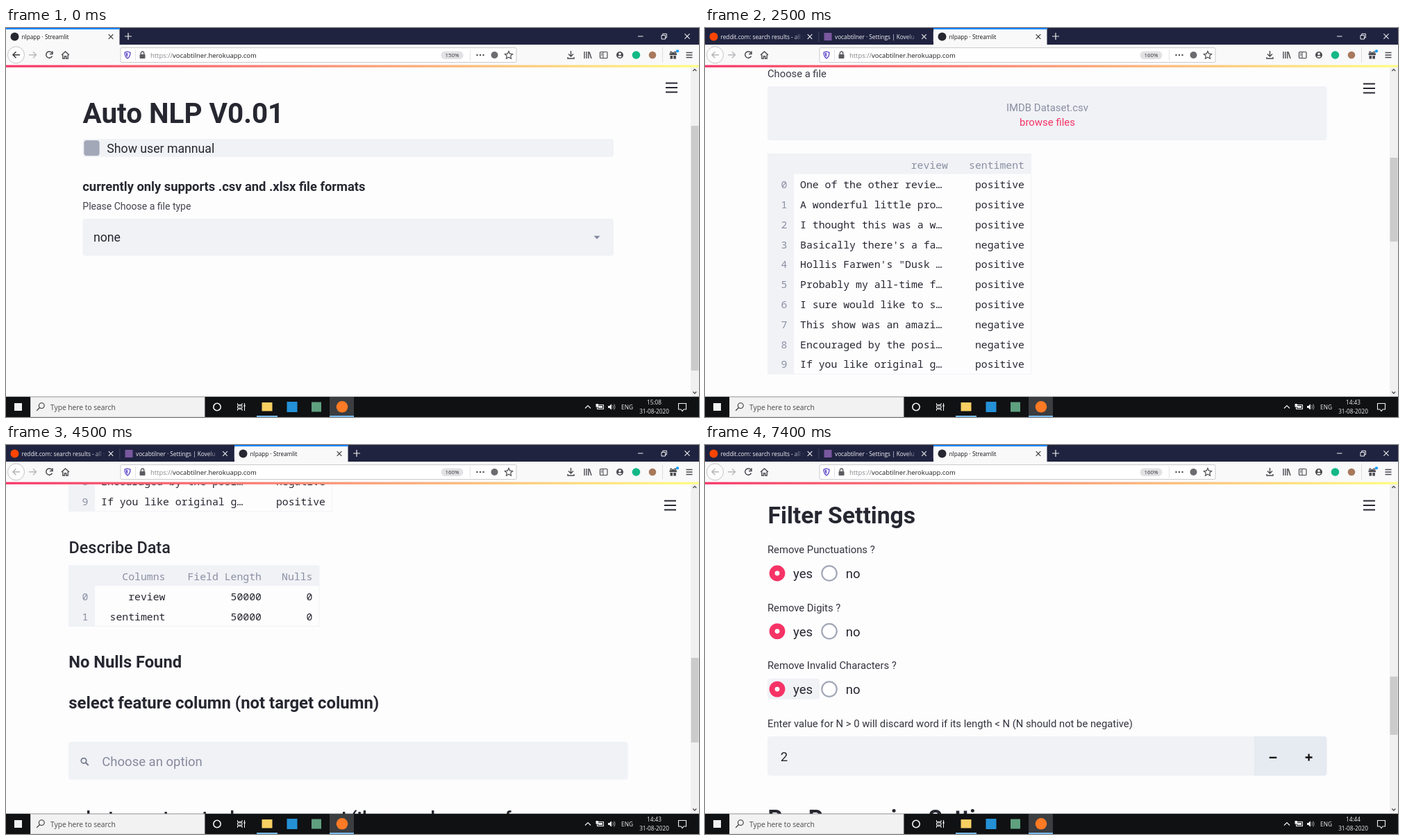
Write an HTML page that moves like this. It is 998 px wide and 561 px high and loops after 8 s.

```html
<!DOCTYPE html>
<html lang="en">
<head>
<meta charset="utf-8">
<title>Auto NLP</title>
<style>
html, body { margin: 0; width: 100%; height: 100%; overflow: hidden; background: #fdfdfe; }
svg { display: block; width: 100vw; height: 100vh; }
text { white-space: pre; }
.page { font-family: Roboto, sans-serif; }
.ui { font-family: "Open Sans", "Noto Sans", sans-serif; }
.mono { font-family: "Noto Sans Mono", "Liberation Mono", monospace; }
</style>
</head>
<body>
<svg id="stage" viewBox="0 0 998 561" xmlns="http://www.w3.org/2000/svg"></svg>
<script>
const INK = "#262730", MUTED = "#8a8fa2", GRAY = "#a3a8b8", PANEL = "#f0f2f6", PINK = "#f63366", NAVY = "#202340";
const APP = "vocabtilner";

const esc = s => s.replace(/&/g, "&amp;").replace(/</g, "&lt;").replace(/>/g, "&gt;");
const attrs = o => Object.entries(o).map(([k, v]) => ` ${k}="${v}"`).join("");
const rect = (x, y, w, h, fill, more = {}) => `<rect${attrs({ x, y, width: w, height: h, fill, ...more })}/>`;
const circle = (cx, cy, r, fill, more = {}) => `<circle${attrs({ cx, cy, r, fill, ...more })}/>`;
const line = (d, stroke, width = 1, more = {}) => `<path${attrs({ d, fill: "none", stroke, "stroke-width": width, ...more })}/>`;
const shape = (d, fill) => `<path d="${d}" fill="${fill}"/>`;
const label = (cls, x, y, size, s, fill = INK, more = {}) =>
  `<text${attrs({ class: cls, x, y, "font-size": size, fill, ...more })}>${esc(s)}</text>`;
const page = (...a) => label("page", ...a);
const bold = (x, y, size, s) => page(x, y, size, s, INK, { "font-weight": 700 });
const ui = (...a) => label("ui", ...a);
const mono = (x, y, s, fill = INK) => label("mono", x, y, 14.8, s, fill, { "text-anchor": "end" });
const centred = { "text-anchor": "middle" };
const panel = (y, h, more = {}) => rect(90, y, 805.5, h, PANEL, { rx: 4, ...more });
const cross = (x, y, r, color) => line(`M${x - r} ${y - r}l${2 * r} ${2 * r}m0 ${-2 * r}l${-2 * r} ${2 * r}`, color, 1.1);
const plus = (x, y, r, color, w) => line(`M${x - r} ${y}h${2 * r}M${x} ${y - r}v${2 * r}`, color, w);
const arrow = (x, y) => shape(`M${x - 4.5} ${y - 2.2}h9l-4.5 4.6z`, "#8388a0");
const menu = (x, y) => line(`M${x} ${y}h17m-17 6.5h17m-17 6.5h17`, INK, 2);

// Browser window
function tab(x, title, color, active, round = true) {
  const bg = active ? "#f9f9fa" : NAVY;
  return rect(x, 0, 163.5, 24, bg) +
    (active ? rect(x, 0, 163.5, 2, "#0a84ff") : line(`M${x + 164} 5v15`, "#4b4d66")) +
    (round ? circle(x + 12.5, 12.5, 6, color) : rect(x + 7, 7, 11, 11, color)) +
    `<svg x="${x}" y="0" width="142" height="24">${ui(22.5, 15.8, 8.25, title, active ? "#18181a" : "#f2f2f5")}</svg>` +
    rect(x + 126, 3, 17, 20, `url(#${active ? "fadeLight" : "fadeDark"})`) +
    cross(x + 151, 12.5, 3.3, active ? "#333" : "#eee");
}

function tabs(scene) {
  const own = x => tab(x, "nlpapp · Streamlit", INK, true);
  if (!scene.section) return own(0) + plus(176, 12, 5, "#eee", 1.2);
  return tab(0, "reddit.com: search results - all subs", "#ff4500", false) +
    tab(164.5, `${APP} · ${scene.section} | Kovelu`, "#79589f", false, false) +
    own(329) + plus(505, 12, 5, "#eee", 1.2);
}

function toolbar(scene) {
  const dark = "#4a4a4f";
  const back = scene.section ? "#b5b5b8" : "#3a3a3e";
  return rect(0, 24, 998, 30, "#f9f9fa") +
    circle(14.5, 38.8, 12, "#fdfdfd", { stroke: "#c4c4c8", "stroke-width": 1 }) +
    line("M20 38.8h-10m4.5-4.5l-4.5 4.5l4.5 4.5", back, 1.5) +
    line("M33 38.8h10.5m-4.5-4.5l4.5 4.5l-4.5 4.5", "#b9b9bc", 1.4) +
    line("M66.3 36.2a4.6 4.6 0 1 0 .2 4.4M67 33.5v4h-4", dark, 1.5) +
    line("M80 39l5.5-5l5.5 5M81.8 38.5v5.5h2.6v-3.4h2.2v3.4h2.6v-5.5", dark, 1.4) +
    rect(165, 28.5, 570, 21, "#fff", { stroke: "#cbcbce", rx: 1.5 }) +
    line("M175 34l4 1.3q0 6.2-4 8.6q-4-2.4-4-8.6z", "#5b45c9", 1.3) +
    shape("M175 35.7v6.3q-2.3-2-2.4-5.6z", "#5b45c9") +
    line("M186.5 31v16M668.5 31v16", "#e3e3e5") +
    rect(192.5, 38, 8, 6, "#5c5c61", { rx: 1 }) + line("M194.3 38v-1.8a2.2 2.2 0 0 1 4.4 0v1.8", "#5c5c61", 1.4) +
    `<text class="ui" x="208" y="42.6" font-size="9.42" fill="#85858a">https://<tspan fill="#1d1d20">${APP}.herokuapp.com</tspan></text>` +
    rect(626.5, 33.5, 32, 11.5, "#e2e2e5", { rx: 5.7 }) +
    ui(642.5, 42.2, 7.9, scene.zoom, "#333", centred) +
    [678.5, 683, 687.5].map(x => circle(x, 39, 1.2, dark)).join("") +
    circle(703.5, 39, 5, "#6b6b70") +
    line("M724 33.5l1.7 3.6l3.9 .5l-2.9 2.7l.8 3.9l-3.5-1.9l-3.5 1.9l.8-3.9l-2.9-2.7l3.9-.5z", dark, 1.2) +
    line("M813.5 33v8m-3.5-3.4l3.5 3.5l3.5-3.5M809 42v2h9v-2", dark, 1.4) +
    line("M833 34v10m3-10v10m2.8-10v10m1.2-9.5l3 9.5", dark, 1.4) +
    rect(855.5, 34.5, 10.5, 9, "none", { stroke: dark, "stroke-width": 1.2, rx: 1 }) + line("M860 35v8M857 37h2M857 39h2", dark) +
    circle(884, 39, 5, dark) + circle(884, 37.2, 1.8, "#fff") + shape("M881 41q3-2 6 0q-3 3-6 0", "#fff") +
    circle(907.5, 39, 5.8, "#12b886") + circle(931, 39, 5.3, "#a8795c") +
    line("M945.5 28v22", "#dedee0") +
    rect(955.5, 36.5, 10.5, 2.6, dark) + rect(956.5, 40, 3.6, 4.5, dark) + rect(961.3, 40, 3.6, 4.5, dark) +
    line("M960.7 36.5q-3.5-4.5-4 -1.2q.5 1.2 4 1.2q3.5-4.5 4-1.2q-.5 1.2-4 1.2", dark, 1.1) +
    circle(967, 33.3, 2.1, "#0a9bf5") +
    line("M979.5 35.5h9m-9 3.5h9m-9 3.5h9", dark, 1.3);
}

function chrome(scene) {
  const [top, bottom] = scene.thumb;
  return rect(0, 0, 998, 24, NAVY) + tabs(scene) +
    line("M910 12h7.5M944 10.5h5.5v5.5h-5.5zM945.8 10.3v-2h5.6v5.7h-1.8", "#f0f0f3") + cross(981, 12, 3.6, "#f0f0f3") +
    toolbar(scene) +
    rect(0, 53.5, 998, 3.2, "url(#brand)") +
    rect(986, 56.7, 12, 475.3, "#f0f0f1") + rect(986.5, top, 11, bottom - top, "#cbcbcc") +
    line("M989.3 62l2.5-2.5l2.5 2.5M989.3 524.5l2.5 2.5l2.5-2.5", "#505050", 1.3);
}

function taskbar(clock) {
  const white = "#f2f2f2";
  return rect(0, 531.7, 998, 29.3, "#101113") +
    rect(12, 541, 11, 11, white) +
    rect(35.5, 532.2, 250.5, 28.8, "#f2f2f3", { stroke: "#cfcfd1" }) +
    circle(51.3, 544.6, 3.9, "none", { stroke: "#333", "stroke-width": 1.1 }) + line("M48.5 547.5l-4.3 4.3", "#333", 1.2) +
    ui(64, 550.5, 10.25, "Type here to search", "#4a4a4a") +
    circle(304, 546.5, 5.2, "none", { stroke: white, "stroke-width": 1.6 }) +
    line("M333.5 541v2.5h6.5v-2.5M333.5 552v-2.5h6.5v2.5M333.5 545h6.5v3h-6.5zM343.5 541v11", white) + rect(342.5, 543.5, 2, 2.5, white) +
    rect(466, 532, 35, 29, "#3b3d40") +
    rect(361, 559, 30, 2, "#76b9ed") + rect(466, 559, 35, 2, "#76b9ed") +
    rect(368.5, 540, 15, 12.5, "#f7cf62") +
    rect(404.5, 539, 15, 15, "#2491d6") +
    rect(440, 539.5, 14, 14, "#5fa07f") +
    circle(484, 546.3, 8.3, "#ff7a25") +
    line("M834 548.5l4-4l4 4", white, 1.2) +
    rect(851.5, 543.5, 9, 6, "none", { stroke: white }) + rect(853, 545, 6, 3, white) + rect(849.5, 542, 3.5, 4.5, white) +
    shape("M867 545h2l3-2.8v8.6l-3-2.8h-2z", white) + line("M873.8 544q1.5 2.5 0 5M875.8 542.5q2.5 4 0 8", "#b9b9b9", .9) +
    ui(894.5, 549.5, 8.3, "ENG", white, centred) +
    ui(933.5, 542.8, 8.2, clock, white, centred) + ui(933.5, 555.7, 8.2, "31-08-2020", white, centred) +
    line("M968.5 541.5h11v8.5h-3.5l-2 2.5l-2-2.5h-3.5z", white, 1.1);
}

// Page contents
function home() {
  return bold(110.5, 137, 40.4, "Auto NLP V0.01") +
    rect(110.5, 160, 764.5, 26, PANEL, { rx: 4 }) + rect(112.3, 162, 22.3, 22.3, GRAY, { rx: 4 }) +
    page(145.3, 179.8, 17.7, "Show user mannual") +
    bold(110.3, 234.5, 18.35, "currently only supports .csv and .xlsx file formats") +
    page(110.3, 261.6, 14.03, "Please Choose a file type", "#45464f") +
    rect(110.5, 275, 764.5, 53.5, PANEL, { rx: 4 }) +
    page(126, 308.3, 17.7, "none") + arrow(851, 302);
}

function fileType() {
  return bold(90, 54.3, 19.5, "currently only supports .csv and .xlsx file formats") +
    page(90, 84, 14.8, "Please Choose a file type", "#3a3b45") +
    page(90, 516.5, 14.95, "Made with Streamlit", "#c3c6d4");
}

function dropdown() {
  return fileType() + panel(208.5, 78.5) +
    panel(99, 54.7, { x: 91, width: 803.5, stroke: PINK, "stroke-width": 2 }) +
    line("M106.5 114v24", "#222") + page(107, 133.3, 17.7, "csv") + arrow(870, 126.7) +
    rect(83, 164, 805, 162.5, "#fefefe", { rx: 3.5, filter: "url(#shadow)" }) +
    rect(83, 173.3, 805, 48, PANEL) +
    page(102, 204, 18.6, "none") + bold(102, 252, 18.4, "csv") + page(102, 299.5, 18.6, "xlsx", MUTED);
}

function uploading() {
  return fileType() + panel(98, 56.7) +
    page(106.5, 133.5, 17.7, "csv", INK, { "font-weight": 500 }) + arrow(870, 126.7) +
    page(90, 194.3, 14.75, "Choose a file", "#3a3b45") + panel(208.5, 78.5) +
    circle(451.3, 236, 7.7, "none", { stroke: "#a9abb3", "stroke-width": 2.7, "stroke-dasharray": "37 12", transform: "rotate(-85 451.3 236)" }) +
    page(464, 240.7, 14.95, "Uploading...", MUTED) +
    rect(462.5, 245.8, 60.5, 26.4, "#fff", { rx: 5, stroke: PINK }) +
    page(492.8, 264.7, 14.7, "Cancel", PINK, centred);
}

// Columns are [right edge, title]; rows hold one cell per column.
function table(top, width, columns, rows, edges = columns.map(c => c[0])) {
  const step = 28.8, height = step * (rows.length + 1) + .9;
  const cells = rows.map((row, i) => {
    const y = top + 49.9 + step * i;
    return mono(118.3, y, String(i), MUTED) + row.map((s, j) => mono(edges[j], y, s)).join("");
  }).join("");
  return rect(90.5, top, width, height, "none", { stroke: PANEL }) +
    rect(90, top, width + .5, 29.2, PANEL) + rect(90, top, 38, height, PANEL) +
    columns.map(([x, s]) => mono(x, top + 21.3, s, MUTED)).join("") + cells;
}

const REVIEWS = [
  "One of the other revie…", "A wonderful little pro…", "I thought this was a w…", "Basically there's a fa…",
  "Hollis Farwen's \"Dusk …", "Probably my all-time f…", "I sure would like to s…", "This show was an amazi…",
  "Encouraged by the posi…", "If you like original g…"
];
const NEGATIVE = [3, 7, 8];
const reviewTable = top => table(top, 379, [[350, "review"], [460, "sentiment"]],
  REVIEWS.map((s, i) => [s, NEGATIVE.includes(i) ? "negative" : "positive"]), [341.3, 460]);

function preview() {
  return page(90, 70.5, 14.75, "Choose a file", "#3a3b45") + panel(84, 78) +
    page(493, 120, 14.95, "IMDB Dataset.csv", MUTED, centred) +
    page(493, 140.6, 14.95, "browse files", PINK, centred) + reviewTable(181.3);
}

function describe() {
  return reviewTable(-222.1) +
    page(90.5, 155.5, 23.4, "Describe Data", INK, { "font-weight": 500 }) +
    table(174, 360.5, [[229.5, "Columns"], [368, "Field Length"], [441.5, "Nulls"]],
      [["review", "50000", "0"], ["sentiment", "50000", "0"]]) +
    bold(90.3, 321, 23.7, "No Nulls Found") +
    bold(90.3, 380, 23.9, "select feature column (not target column)") +
    panel(428, 54.5) +
    circle(112, 455.3, 3.7, "none", { stroke: "#777b8e", "stroke-width": 1.8 }) + line("M114.7 458l4 4", "#777b8e", 2) +
    page(138.3, 463, 18.5, "Choose an option", "#868a9c") +
    bold(90.3, 544.8, 23.9, "select some target columns you want (there can be more of");
}

function choice(y, question, hover) {
  return page(90, y, 14.8, question, "#33343d") +
    (hover ? rect(90, y + 13.5, 75, 30, PANEL, { rx: 4 }) : "") +
    circle(104, y + 28.8, 11.4, PINK) + circle(104, y + 28.8, 3.4, "#fff") + page(127, y + 36, 18.5, "yes") +
    circle(179, y + 28.8, 10.7, "#fff", { stroke: GRAY, "stroke-width": 2.2 }) + page(202.7, y + 36, 18.5, "no");
}

function filters() {
  return page(90, 53.3, 14.8, "preview the cleaned column before you apply any", "#33343d") +
    bold(90.5, 113.3, 33.7, "Filter Settings") +
    choice(156.2, "Remove Punctuations ?") + choice(239.8, "Remove Digits ?") +
    choice(323.3, "Remove Invalid Characters ?", true) +
    page(90, 407, 14.8, "Enter value for N > 0 will discard word if its length < N (N should not be negative)", "#33343d") +
    panel(420.3, 56.5) + shape("M791 420.3h100.5a4 4 0 0 1 4 4v48.5a4 4 0 0 1-4 4h-100.5z", "#e6eaf1") +
    page(108.7, 456.3, 18.5, "2") +
    line("M812.7 450.8h10.6", "#111", 2.3) + plus(869.6, 450.5, 5, "#111", 2.3) +
    bold(90.5, 549.5, 32.6, "Pre Processing Settings");
}

const SCENES = [
  { end: 500, body: home, zoom: "150%", clock: "15:08", thumb: [141, 494] },
  { end: 1500, body: dropdown, section: "Logs", clock: "14:57", thumb: [409, 519] },
  { end: 2500, body: uploading, section: "Logs", clock: "14:57", thumb: [409, 519] },
  { end: 4500, body: preview, section: "Settings", clock: "14:43", thumb: [187, 308] },
  { end: 6500, body: describe, section: "Settings", clock: "14:43", thumb: [307, 429] },
  { end: 8000, body: filters, section: "Settings", clock: "14:44", thumb: [334, 418] }
].map(s => ({ zoom: "160%", ...s }));

const gradient = (id, from, to, opacity = 1) =>
  `<linearGradient id="${id}"><stop stop-color="${from}" stop-opacity="${opacity}"/><stop offset="1" stop-color="${to}"/></linearGradient>`;

const stage = document.getElementById("stage");
stage.innerHTML = `<defs>${gradient("brand", PINK, "#fffd80")}${gradient("fadeDark", NAVY, NAVY, 0)}${gradient("fadeLight", "#f9f9fa", "#f9f9fa", 0)}
  <filter id="shadow" x="-5%" y="-20%" width="110%" height="145%"><feDropShadow dx="0" dy="4" stdDeviation="7" flood-color="#262730" flood-opacity=".3"/></filter></defs>` +
  rect(0, 0, 998, 561, "#fdfdfe") +
  SCENES.map(s => `<g class="scene" display="none">${s.body()}${s.section ? menu(948, 80.5) : menu(950, 79.5)}${chrome(s)}${taskbar(s.clock)}</g>`).join("");
const groups = [...stage.querySelectorAll(".scene")];

function render(time) {
  const t = time % 8000;
  const current = SCENES.findIndex(s => t < s.end);
  groups.forEach((g, i) => g.setAttribute("display", i === current ? "inline" : "none"));
}

const start = performance.now();
function tick(now) {
  render(Math.max(0, now - start));
  requestAnimationFrame(tick);
}
render(0);
requestAnimationFrame(tick);
</script>
</body>
</html>
```
